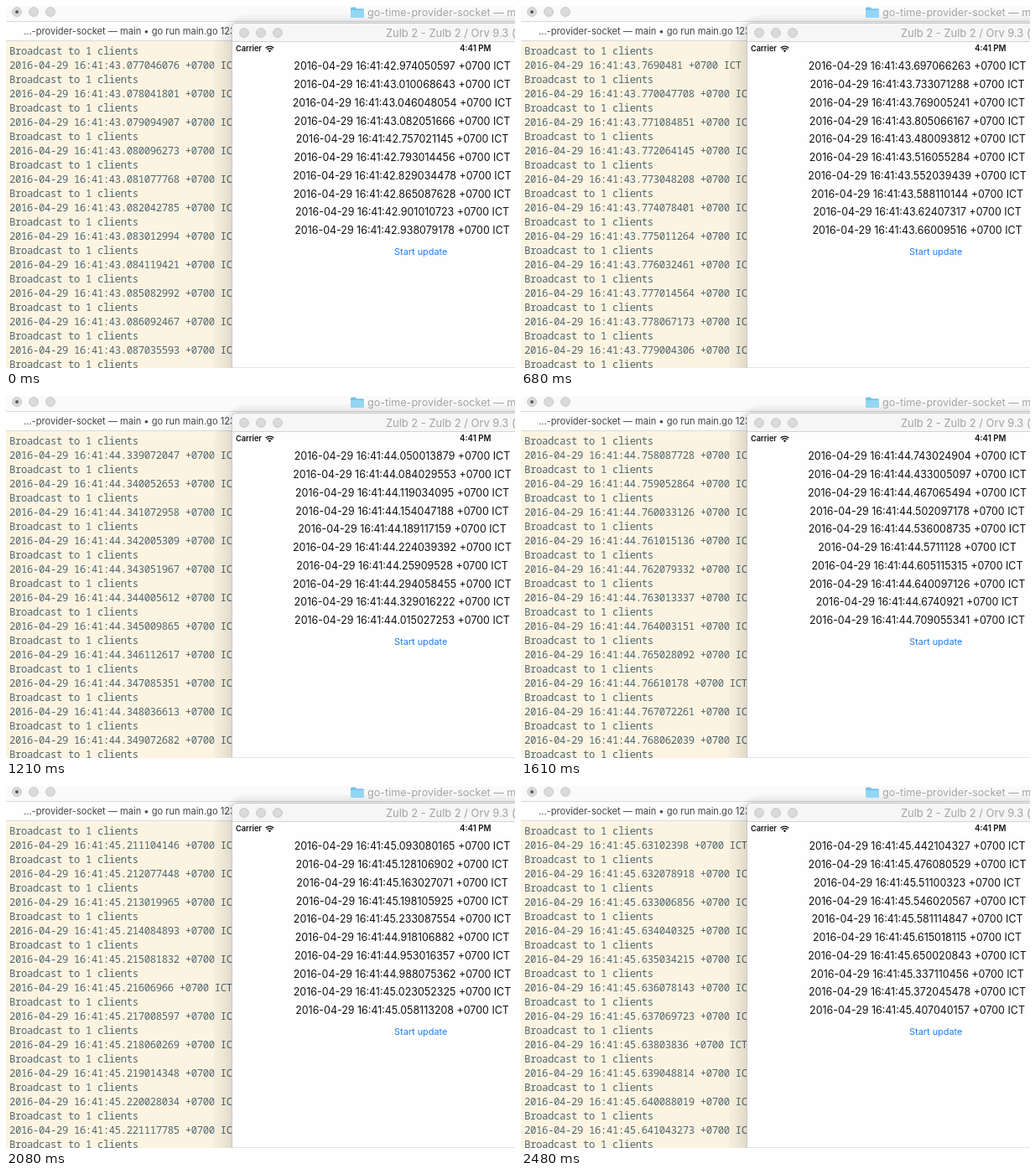
Write an HTML page that moves like this. It is 607 px wide and 432 px high and loops after 2580 ms.

```html
<!DOCTYPE html>
<html lang="en">
<head>
<meta charset="utf-8">
<title>Socket clock</title>
<style>
html, body { margin: 0; width: 100%; height: 100%; overflow: hidden; background: #fff; }
svg { display: block; width: 607px; height: 432px; font-family: Inter, "Open Sans", sans-serif; }
text { white-space: pre; }
#term text { font: 12.2px "Noto Sans Mono", "DejaVu Sans Mono", monospace; letter-spacing: -.32px; fill: #4f666f; }
#list text { font-size: 12.45px; fill: #111; text-anchor: middle; }
.status { font-size: 9.2px; font-weight: 600; fill: #111; }
.clock { font-size: 9.7px; }
.title { fill: #a2a2a2; }
.lamp circle { fill: #dadada; stroke: #c6c6c6; }
</style>
</head>
<body>
<svg viewBox="0 0 607 432">
  <rect width="607" height="432" fill="#fcf4e1"/>
  <rect width="607" height="19" fill="#fafafa"/>
  <rect y="19" width="607" height="22" fill="#fefefe"/>
  <path d="M0 18.5H607M0 41.5H607" stroke="#dadada"/>
  <g class="lamp">
    <circle cx="13" cy="7" r="5.4"/><circle cx="33" cy="7" r="5.4"/><circle cx="53" cy="7" r="5.4"/>
  </g>
  <circle cx="13" cy="7" r="2" fill="#5a5a5a"/>
  <text x="21" y="34" font-size="11.1" fill="#444">...-provider-socket — main • go run main.go 123</text>
  <g id="term"></g>

  <g id="shadow"></g>
  <path d="M411 3.2q0-1.7 1.7-1.7h4l1.6 1.7h7q1.7 0 1.7 1.7v7.4q0 1.7-1.7 1.7h-12.6q-1.7 0-1.7-1.7z" fill="#74c3ea"/>
  <path d="M411 5h16v7.3q0 1.7-1.7 1.7h-12.6q-1.7 0-1.7-1.7z" fill="#93d6f4"/>
  <text class="title" x="431" y="11.5" font-size="12.6">go-time-provider-socket — main</text>

  <path d="M269.5 432V26q0-5.5 5.5-5.5H612V432z" fill="#fefefe" stroke="#c9c9c9"/>
  <path d="M270 42V26q0-5 5-5H607V42z" fill="#f6f6f6"/>
  <path d="M270 42.5H607" stroke="#d4d4d4"/>
  <g class="lamp">
    <circle cx="284" cy="32" r="5.4"/><circle cx="304" cy="32" r="5.4"/><circle cx="324" cy="32" r="5.4"/>
  </g>
  <text class="title" x="453" y="36.7" font-size="12.9">Zulb 2 - Zulb 2 / Orv 9.3 (</text>
  <text class="status" x="274" y="54.3">Carrier</text>
  <path d="M309.7 50.2a6.8 6.8 0 0 1 9.6 0M311.4 52a4.4 4.4 0 0 1 6.2 0" fill="none" stroke="#111" stroke-width="1.3"/>
  <path d="M314.5 55.2l-1.7-1.8a2.4 2.4 0 0 1 3.4 0z" fill="#111"/>
  <text class="status clock" x="541" y="54.3">4:41 PM</text>
  <g id="list"></g>
  <text x="494.7" y="297" font-size="10.9" text-anchor="middle" fill="#1a7df5">Start update</text>
</svg>
<script>
const NS = 'http://www.w3.org/2000/svg';
const LOOP = 2580, TICKS = 44;

// Ticks last 60 ms, a few of them 50 ms
const SHORT = new Set([0, 3, 7, 10, 20, 23, 26, 29, 37, 40]);
const starts = [0];
for (let k = 0; k < TICKS - 1; k++) starts.push(starts[k] + (SHORT.has(k) ? 50 : 60));

// Clock readings in ms after 16:41:43
const SENT = [[0, 77], [280, 354], [680, 769], [1210, 1339], [1610, 1758], [2080, 2211], [2480, 2631]];     // by time
const RECEIVED = [[0, -243], [9, 82], [17, 371], [29, 805], [44, 1329], [56, 1743], [70, 2233], [82, 2650]]; // by entry

function track(points, x) {
  const i = Math.max(1, points.findIndex(p => p[0] >= x));
  const [x0, y0] = points[i - 1], [x1, y1] = points[i];
  return y0 + (y1 - y0) * (x - x0) / (x1 - x0);
}

function noise(n) {
  const s = Math.sin(n * 12.9898 + 4.1) * 43758.5453;
  return s - Math.floor(s);
}

// Whole milliseconds plus a small seeded remainder, without trailing zeros
function stamp(ms, seed) {
  const sec = 43 + Math.round(ms) / 1000 + noise(seed) * 1.2e-4;
  return `2016-04-29 16:41:${sec.toFixed(9).replace(/0+$/, '')} +0700 ICT`;
}

function add(parent, tag, attrs, text = '') {
  const el = document.createElementNS(NS, tag);
  for (const name in attrs) el.setAttribute(name, attrs[name]);
  el.textContent = text;
  return parent.appendChild(el);
}

const [term, list, shadow] = ['term', 'list', 'shadow'].map(id => document.getElementById(id));
const logRows = [], listRows = [];
for (let i = 0; i < 12; i++) {
  add(term, 'text', { x: 4, y: 57.7 + 34 * i }, 'Broadcast to 1 clients');
  if (i < 11) logRows.push(add(term, 'text', { x: 4, y: 74.7 + 34 * i }));
}
for (let i = 0; i < 10; i++) listRows.push(add(list, 'text', { x: 472.5, y: 76.4 + 21.75 * i }));

// Soft window shadow from nested round rectangles
for (let i = 0; i < 11; i++) {
  add(shadow, 'rect', {
    x: 248 + 2 * i, y: 10 + i, width: 420, height: 500,
    rx: 42 - 3.4 * i, 'fill-opacity': i ? 0.003 + 0.001 * i : 0.025
  });
}

let shown = -1;
function draw(time) {
  const tick = starts.findLastIndex(s => s <= time);
  if (tick === shown) return;
  shown = tick;
  const sent = track(SENT, starts[tick]);
  logRows.forEach((row, j) => { row.textContent = stamp(sent + j, tick * 11 + j); });

  // 73 entries arrive in one loop; each replaces the oldest of the ten rows
  const head = 9 + Math.floor(tick * 73 / (TICKS - 1));
  for (let n = head - 9; n <= head; n++) {
    listRows[(n + 4) % 10].textContent = stamp(track(RECEIVED, n), n + 1000);
  }
}

const born = performance.now();
function loop() {
  draw((performance.now() - born) % LOOP);
  requestAnimationFrame(loop);
}
loop();
</script>
</body>
</html>
```
